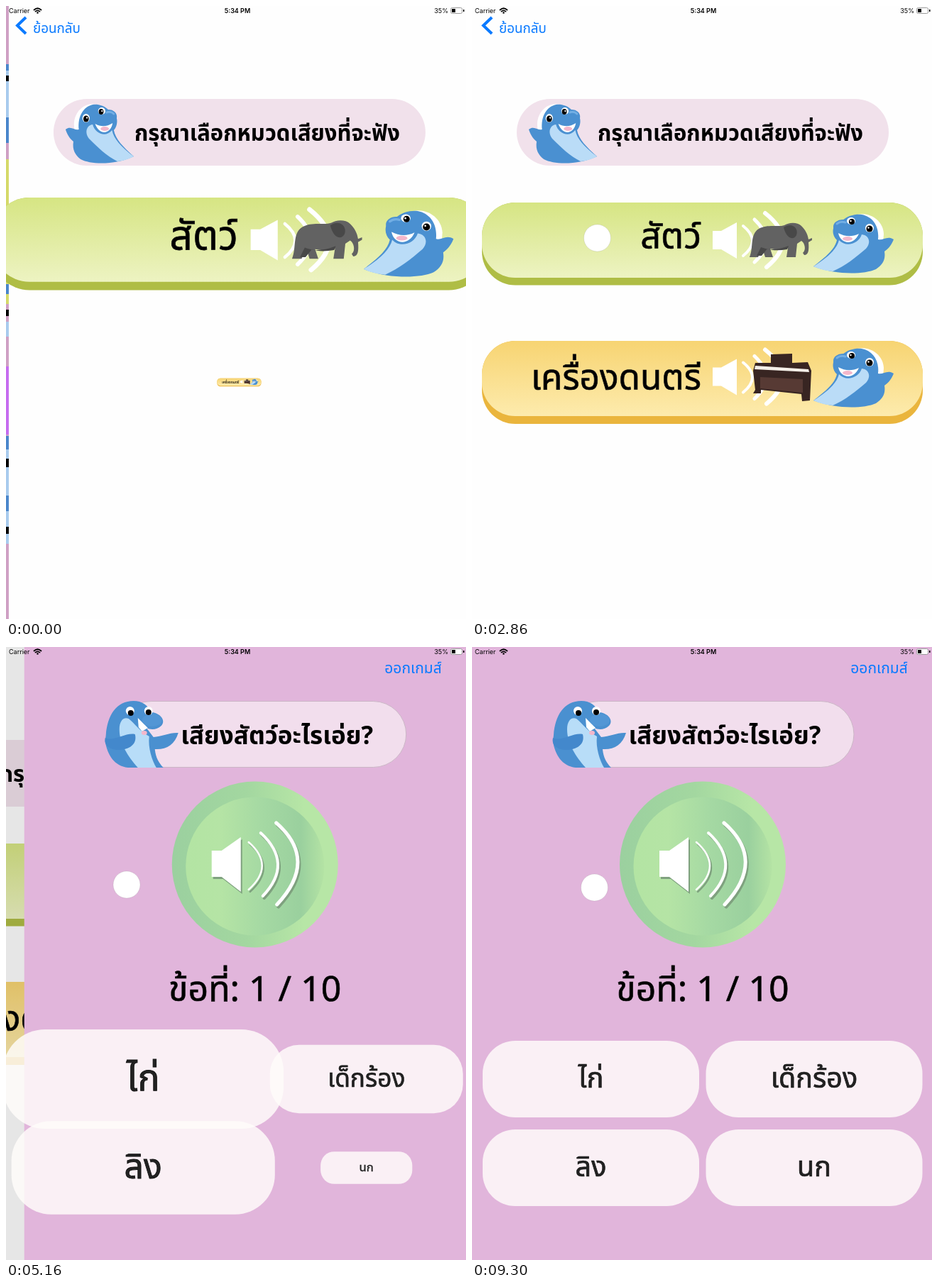
Animation of 648x864 px, one loop 9.33 s. Source, as an HTML page:

```html
<!DOCTYPE html>
<html lang="th">
<head>
<meta charset="utf-8">
<style>
html, body { margin: 0; width: 100%; height: 100%; overflow: hidden; background: #fff; }
svg { display: block; width: 100vw; height: 100vh; }
text { font-family: "Noto Sans Thai Looped", "Noto Sans Thai", "Noto Sans", sans-serif; }
.status { font-family: Inter, Roboto, sans-serif; font-size: 9px; }
.mid { text-anchor: middle; }
.end { text-anchor: end; }
.bold { font-weight: 600; }
.medium { stroke: #111; stroke-width: .7px; }
.link { fill: #0a7aff; }
.line { fill: none; stroke-linecap: round; }
</style>
</head>
<body>
<svg viewBox="0 0 648 864">
  <defs>
    <linearGradient id="greenFace" x2="0" y2="1"><stop stop-color="#d6e583"/><stop offset="1" stop-color="#edf3c2"/></linearGradient>
    <linearGradient id="yellowFace" x2="0" y2="1"><stop stop-color="#f7d472"/><stop offset="1" stop-color="#fdebad"/></linearGradient>
    <linearGradient id="rim"><stop stop-color="#9bd09f"/><stop offset=".45" stop-color="#a3d7a0"/><stop offset=".8" stop-color="#b7e6a6"/><stop offset="1" stop-color="#b7e6a6"/></linearGradient>
    <linearGradient id="disc"><stop stop-color="#b3e4a3"/><stop offset=".25" stop-color="#b5e4a5"/><stop offset=".55" stop-color="#a5d9a3"/><stop offset=".83" stop-color="#9ad09e"/><stop offset="1" stop-color="#b4e3a4"/></linearGradient>

    <g id="dolphin">
      <path fill="#fff" d="M62 1C78 -3 98 8 99 28L98 42L70 20Z"/>
      <path fill="#4a90d1" d="M0 74C18 60 30 50 33 37C24 29 26 12 40 10C48 2 60 0 68 1C84 4 93 18 91 36C98 38 104 30 113 36C109 46 104 50 100 53C102 65 97 72 88 78C70 86 30 86 0 74Z"/>
      <path fill="#badcf7" d="M0 74C22 60 33 49 36 37C46 48 64 42 68 29C78 30 82 40 74 49C60 61 44 74 27 81C16 80 6 77 0 74Z"/>
      <path fill="#fff" d="M35 27C38 43 57 45 64 28C54 33 44 32 35 27Z"/>
      <ellipse cx="48" cy="35" rx="7" ry="3" fill="#f3b7cb"/>
      <ellipse cx="41" cy="18" rx="13" ry="10" fill="#4a90d1"/>
      <path class="line" stroke="#72aee4" stroke-width="3" d="M33 14Q38 10 45 12"/>
      <g fill="#fff"><ellipse cx="53" cy="10" rx="6" ry="5"/><ellipse cx="79" cy="20" rx="6" ry="6"/></g>
      <circle cx="54" cy="11" r="4"/><circle cx="79" cy="21" r="4.5"/>
      <g fill="#fff"><circle cx="52.500" cy="10" r="1.200"/><circle cx="77.500" cy="19.500" r="1.200"/></g>
    </g>

    <g id="sound">
      <path fill="#fff" d="M339 317H351L373 305V356L351 343H339Z"/>
      <g class="line" stroke="#fff">
        <path stroke-width="4" d="M382 310Q408 331 382 352"/>
        <path stroke-width="5" d="M398 301Q430 331 398 361"/>
        <path stroke-width="6" d="M413 292Q461 330 415 368"/>
      </g>
    </g>

    <g id="speaker">
      <path stroke="none" d="M264 287H278L305 268V345L278 324H264Z"/>
      <g class="line">
        <path stroke-width="2.500" d="M316 275Q354 308 316 342"/>
        <path stroke-width="4" d="M333 262Q380 305 336 351"/>
        <path stroke-width="5" d="M355 248Q415 300 356 363"/>
      </g>
    </g>
  </defs>

  <g id="previous">
    <path fill="#cfa0c4" d="M0 0H12V864H0Z"/>
    <path fill="#a8cbee" d="M0 82H12V193H0ZM0 445H12V466H0ZM0 606H12V758H0Z"/>
    <path fill="#4a86cb" d="M0 82H12V91H0ZM0 157H12V193H0ZM0 392H12V406H0ZM0 606H12V625H0ZM0 690H12V712H0Z"/>
    <path fill="#d5d969" d="M0 216H12V392H0ZM0 406H12V420H0Z"/>
    <path fill="#c66cf0" d="M0 508H12V604H0Z"/>
    <path d="M0 98H4V106H0ZM0 428H4V437H0ZM0 638H4V650H0ZM0 734H4V744H0Z"/>
  </g>

  <g id="list">
    <rect width="648" height="864" fill="#fefefe"/>
    <rect x="63" y="131" width="524" height="94" rx="47" fill="#f1e1eb"/>
    <use href="#dolphin" transform="translate(176 138) scale(-.85 1)"/>
    <text class="mid bold" x="364" y="190" font-size="31">กรุณาเลือกหมวดเสียงที่จะฟัง</text>

    <g id="animals">
      <rect x="14" y="277" width="621" height="116.500" rx="47" fill="#afbd45"/>
      <rect x="14" y="277" width="621" height="106" rx="47" fill="url(#greenFace)"/>
      <text class="end medium" x="323" y="342" font-size="50.500">สัตว์</text>
      <use href="#sound"/>
      <path fill="#626262" d="M391 354C397 340 391 322 404 314C416 307 432 312 440 309C446 305 458 304 464 310C470 316 473 322 474 329L479 327V330L474 333C475 344 474 351 468 351L466 348C471 344 469 334 464 331L458 335L456 354H443L445 341C436 345 428 343 420 342L424 354H413L409 341L403 354Z"/>
      <path fill="#484848" d="M439 312C450 304 461 313 457 323C453 331 443 328 439 312ZM407 340Q424 347 446 338L444 343Q426 346 416 342L408 352H401Z"/>
      <use href="#dolphin" x="481" y="293"/>
      <rect id="press" x="14" y="277" width="621" height="116.500" rx="47"/>
    </g>

    <g id="music">
      <rect x="14" y="472" width="621" height="117" rx="47" fill="#eab53d"/>
      <rect x="14" y="472" width="621" height="106" rx="47" fill="url(#yellowFace)"/>
      <text class="end medium" x="323" y="541" font-size="49.500">เครื่องดนตรี</text>
      <use href="#sound" y="192.500"/>
      <path fill="#382522" d="M421 491L451 490V503L473 502L478 514L476 556L465 557L464 547L407 541V546H396L399 541L396 514L399 503H421Z"/>
      <path fill="#573a34" d="M406 523L466 526V545L406 539Z"/>
      <path fill="#f4efe8" d="M399 507L474 512L475 516L398 512Z"/>
      <use href="#dolphin" x="481" y="482"/>
    </g>

    <g id="spinner" stroke-width="4.500" stroke="#000" stroke-linecap="round"></g>
    <rect id="dim" width="648" height="864"/>
  </g>

  <g id="quiz">
    <rect width="648" height="864" fill="#e1b5db"/>
    <rect x="132" y="76.500" width="406" height="93" rx="46.500" fill="#f2deed" stroke="#cbb6c6"/>
    <path fill="#4a90d0" d="M115 124C117 96 130 76 154 76C166 76 174 82 179 92C192 93 200 104 193 111C187 117 178 117 172 114L182 127C194 126 206 120 217 121C212 138 200 145 184 144C185 156 190 164 196 170H146C127 168 117 152 114 133Z"/>
    <path fill="#b8ddf8" d="M134 116C134 104 140 98 147 101C156 108 162 118 176 126C174 142 180 160 186 170H160C146 154 134 136 134 116Z"/>
    <path fill="#fff" d="M160 100L161 113L166 119L174 114Z"/>
    <ellipse cx="169" cy="121" rx="4" ry="3" fill="#f3b7cb"/>
    <path fill="#4388cc" d="M114 128C126 134 143 120 156 123C160 138 146 146 130 145C117 144 112 136 114 128Z"/>
    <ellipse cx="180" cy="103" rx="14" ry="9" fill="#5296d5"/>
    <g fill="#fff"><circle cx="149" cy="90" r="6"/><circle cx="175" cy="90" r="6"/></g>
    <circle cx="150" cy="93" r="4"/><circle cx="175" cy="92" r="4"/>
    <text class="mid bold" x="356" y="137" font-size="35">เสียงสัตว์อะไรเอ่ย?</text>

    <circle cx="325" cy="306.500" r="117" fill="url(#rim)"/>
    <circle cx="325" cy="309" r="97.500" fill="url(#disc)"/>
    <use href="#speaker" x="2" y="3" fill="#7fa17f" stroke="#7fa17f"/>
    <use href="#speaker" fill="#fff" stroke="#fff"/>
    <text class="mid medium" x="325" y="499" font-size="50">ข้อที่: 1 / 10</text>
  </g>

  <g id="back">
    <path fill="none" stroke="#0a7aff" stroke-width="4" d="M28 16L16 27.500L28 39"/>
    <text class="link" x="38" y="38" font-size="18.800">ย้อนกลับ</text>
  </g>
  <text id="exit" class="link mid" x="573.500" y="37" font-size="21">ออกเกมส์</text>

  <text class="status" x="4" y="10">Carrier</text>
  <g class="line" stroke="#000" stroke-width="1.700" stroke-linecap="butt">
    <path d="M39.500 5.500Q44.500 1 49.500 5.500M41.500 7.700Q44.500 5 47.500 7.700"/>
  </g>
  <circle cx="44.500" cy="9.500" r="1.300"/>
  <text class="status mid bold" x="326" y="10">5:34 PM</text>
  <text class="status end" x="623" y="10">35%</text>
  <rect x="626.500" y="2.500" width="16" height="8" rx="2" fill="#fff" stroke="#999"/>
  <path d="M628 4H633V9H628ZM644 5H645.500V8H644Z"/>

  <circle id="touch" r="19" fill="#fff" stroke="#777" stroke-opacity=".16"/>
</svg>
<script>
const LOOP = 9330, WIDTH = 648, PUSH = 4886;
const $ = id => document.getElementById(id);
const clamp = v => Math.min(1, Math.max(0, v));
const ramp = (t, from, to) => clamp((t - from) / (to - from));
const show = (id, visible) => $(id).setAttribute("visibility", visible ? "visible" : "hidden");
const svgNS = "http://www.w3.org/2000/svg";

function add(parent, tag, attrs) {
  const el = document.createElementNS(svgNS, tag);
  for (const key in attrs) el.setAttribute(key, attrs[key]);
  return parent.appendChild(el);
}

// Cards that pop in: element, centre and start time.
const cards = [
  { el: $("animals"), x: 324.5, y: 335, start: -282 },
  { el: $("music"), x: 324.5, y: 530.5, start: 10 }
];
[["ไก่", 167.5, 609], ["ลิง", 167.5, 734], ["เด็กร้อง", 482, 609], ["นก", 482, 734]].forEach(([label, x, y], i) => {
  const el = add($("quiz"), "g", {});
  add(el, "rect", { x: x - 152.5, y: y - 54, width: 305, height: 108, rx: 46, fill: "#fffdfa", "fill-opacity": .83 });
  add(el, "text", { x, y: y + 12, class: "mid medium", "font-size": 39.5, fill: "#222" }).textContent = label;
  cards.push({ el, x, y, start: 4952 + 50 * i });
});

const spokes = Array.from({ length: 12 }, (_, i) =>
  add($("spinner"), "path", { d: "M323 417V406.500", transform: `rotate(${i * 30} 323 431.500)` }));

// Touch positions: time, x, y.
const touchPath = [
  [0, 187, 541], [970, 187, 541], [1200, 187.5, 460], [1400, 188, 375], [1650, 182, 338], [1900, 179, 327],
  [2460, 178, 326], [2860, 176.5, 327], [3100, 176.5, 327], [3460, 174, 330], [4300, 171, 334],
  [4860, 169, 335], [5160, 170, 335], [6130, 169, 335], [6800, 169, 335], [7000, 170, 337],
  [7230, 171, 337], [7400, 176, 343], [7600, 171, 350], [7760, 171, 350], [7860, 171, 345],
  [8030, 171, 345], [8230, 176, 341], [8900, 176, 341], [9130, 173.5, 340], [9300, 172.5, 339], [LOOP, 172.5, 339]
];

function touchAt(t) {
  const i = touchPath.findIndex(p => p[0] > t);
  const [t0, x0, y0] = touchPath[i - 1], [t1, x1, y1] = touchPath[i];
  const k = (t - t0) / (t1 - t0);
  return [x0 + (x1 - x0) * k, y0 + (y1 - y0) * k];
}

// Fraction of the screen width still to travel in a push.
function remaining(ms) {
  const w = Math.max(0, ms) * .01826;
  return (1 + w) * Math.exp(-w);
}

function popScale(ms) {
  const s = Math.max(0, ms) / 1000, angle = 15.6 * s;
  return 1 - .9 * Math.exp(-5.46 * s) * (Math.cos(angle) + .35 * Math.sin(angle));
}

function draw(t) {
  const listLeft = remaining(t + 394), quizLeft = remaining(t - PUSH);
  const listX = WIDTH * listLeft - 194 * (1 - quizLeft);
  $("list").setAttribute("transform", `translate(${listX} 0)`);
  $("quiz").setAttribute("transform", `translate(${WIDTH * quizLeft} 0)`);
  $("dim").setAttribute("opacity", .1 * (1 - quizLeft));
  $("back").setAttribute("opacity", 1 - ramp(t, PUSH, 5130));
  $("exit").setAttribute("opacity", ramp(t, PUSH, 5150));
  $("press").setAttribute("opacity", .12 * ramp(t, 3070, 3460) * (1 - ramp(t, 3800, 4160)));
  show("previous", t < 300);
  show("spinner", t >= 3830);
  show("touch", t >= 960);

  for (const { el, x, y, start } of cards) {
    el.setAttribute("transform", `translate(${x} ${y}) scale(${popScale(t - start)}) translate(${-x} ${-y})`);
  }

  const head = 9 + Math.floor((t - 4820) * 12 / 1000);
  spokes.forEach((spoke, i) => {
    const age = (((head - i) % 12) + 12) % 12;
    spoke.setAttribute("opacity", Math.max(.27, .83 - age * .1));
  });

  $("touch").setAttribute("transform", `translate(${touchAt(t)})`);
}

function frame() {
  draw(performance.now() % LOOP);
  requestAnimationFrame(frame);
}
frame();
</script>
</body>
</html>
```
